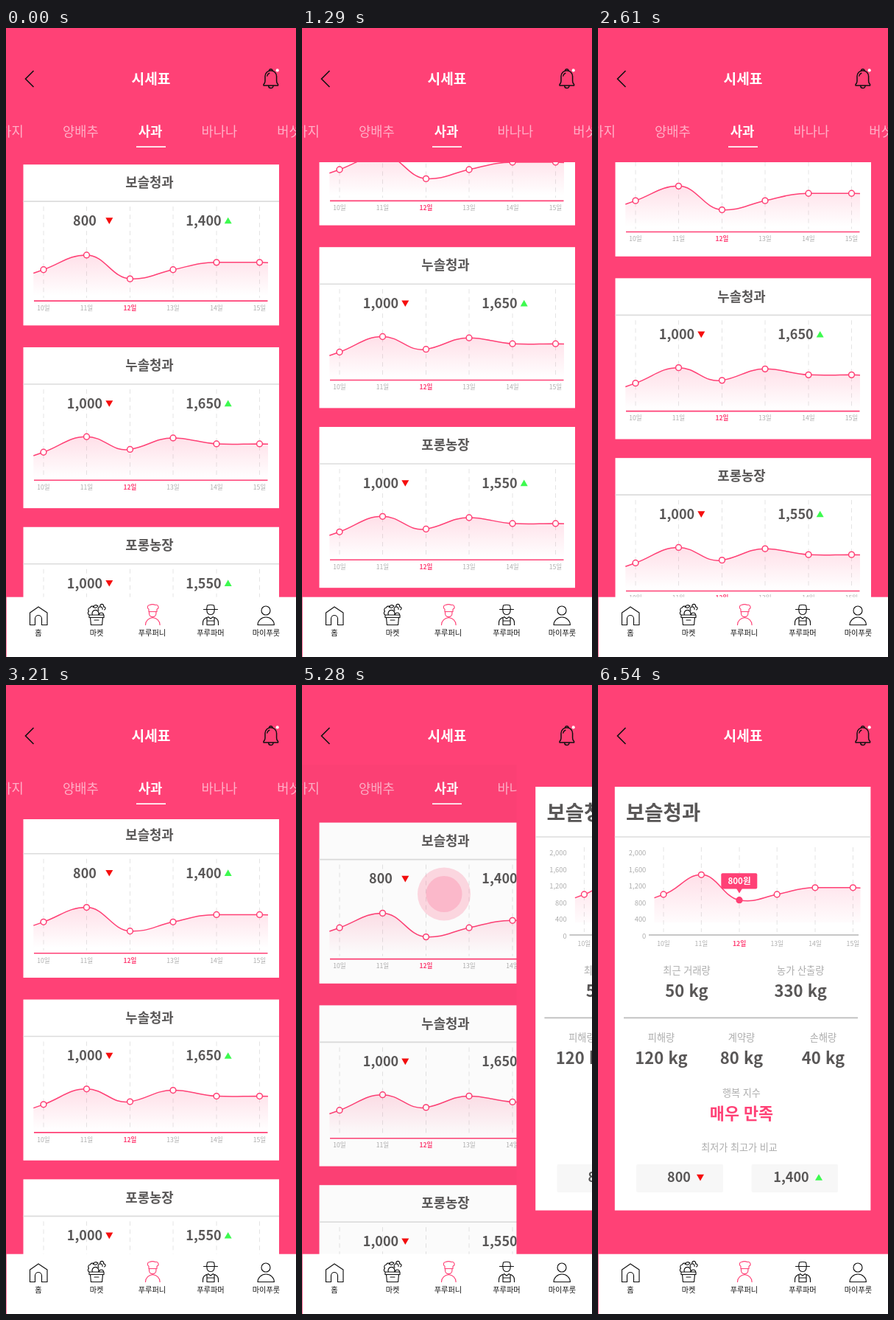
Write an HTML page that moves like this. It is 394x853 px and loops after 8.94 s.

```html
<!DOCTYPE html>
<html lang="ko">
<head>
<meta charset="utf-8">
<style>
html, body { margin: 0; width: 100%; height: 100%; overflow: hidden; background: #ff4176; }
svg { display: block; width: 394px; height: 853px; font-family: 'Noto Sans CJK KR', 'Noto Sans CJK JP', 'Noto Sans CJK', sans-serif; }
</style>
</head>
<body>
<svg id="stage" viewBox="0 0 394 853" xmlns="http://www.w3.org/2000/svg"></svg>
<script>
const PINK = '#ff4176', INK = '#595757', GREY = '#adadad';
const LOOP = 8940;
const SHOPS = ['보슬청과', '누솔청과', '포롱농장'];

const text = (x, y, size, str, fill = INK, weight = 700, anchor = 'middle') =>
  `<text x="${x}" y="${y}" font-size="${size}" fill="${fill}" font-weight="${weight}" text-anchor="${anchor}">${str}</text>`;
const rect = (x, y, w, h, fill, r = 0) =>
  `<rect x="${x}" y="${y}" width="${w}" height="${h}" fill="${fill}" rx="${r}"/>`;
const line = (x1, y1, x2, y2, color, width, extra = '') =>
  `<path d="M${x1} ${y1}L${x2} ${y2}" stroke="${color}" stroke-width="${width}" fill="none" ${extra}/>`;
const down = (x, y) => `<path d="M${x - 5} ${y - 4}h10l-5 8.6z" fill="#f60d0d"/>`;
const up = (x, y) => `<path d="M${x - 5} ${y + 4}h10l-5 -8.6z" fill="#3dfa4f"/>`;
const circle = (x, y, r, fill, extra = '') => `<circle cx="${x}" cy="${y}" r="${r}" fill="${fill}" ${extra}/>`;

// Smooth line through the points; each slope sets the tangent at its point.
function curve(xs, ys, slopes, start, end) {
  let d = `M${start[0]} ${start[1]}L${xs[0]} ${ys[0]}`;
  for (let i = 1; i < xs.length; i++) {
    const h = (xs[i] - xs[i - 1]) * 0.42;
    d += `C${xs[i - 1] + h} ${ys[i - 1] + slopes[i - 1] * h} ${xs[i] - h} ${ys[i] - slopes[i] * h} ${xs[i]} ${ys[i]}`;
  }
  return d + `L${end[0]} ${end[1]}`;
}

function chart({ xs, ys, slopes, start, end, top, axis, base, fade, labelY, labelSize, axisLine, picked }) {
  const d = curve(xs, ys, slopes, start, end);
  return xs.map(x => line(x, top, x, axis - 4, '#e4e4e4', 1, 'stroke-dasharray="6 5"')).join('') +
    `<path d="${d}V${base}H${start[0]}Z" fill="url(#${fade})"/>` + axisLine +
    `<path d="${d}" fill="none" stroke="${PINK}" stroke-width="1.5"/>` +
    xs.map((x, i) =>
      circle(x, ys[i], 3.9, picked === i ? PINK : '#fff', `stroke="${PINK}" stroke-width="1.5"`) +
      text(x, labelY, labelSize, `${10 + i}일`, i === 2 ? PINK : GREY, i === 2 ? 700 : 400)).join('');
}

const cardXs = [51, 109.5, 168.5, 227, 286, 344.5];

function card(i, y, low, high) {
  const first = i === 0, axis = first ? 185 : 180.3;
  const ys = first ? [142.6, 122.8, 155, 142.6, 132.7, 132.7] : [142.3, 121.3, 138.5, 123, 131, 131];
  const slopes = first ? [-.36, 0, .05, -.21, 0, 0] : [-.36, 0, -.16, 0, .05, 0];
  return `<g transform="translate(0 ${y})">` +
    rect(23.5, 0, 347.5, 218.2, '#fff') +
    text(195, 31.2, 17.8, SHOPS[i]) +
    line(23.5, 50, 371, 50, '#dcdcdc', 1.6) +
    chart({
      xs: cardXs, ys, slopes, start: [37.3, ys[0] + 4.8], end: [356, ys[5] + .3], top: 57, axis, base: 180,
      fade: 'cardFade', labelY: axis + 12.8, labelSize: 8.6,
      axisLine: line(38, axis, 355.5, axis, PINK, 1.6)
    }) +
    text(107, 82.8, 18, low) + down(140.3, 76.2) +
    text(268.5, 82.8, 18, high) + up(301.7, 76.2) + '</g>';
}

function detail() {
  const xs = [89, 140.4, 192, 243.2, 295, 346.4];
  const pair = (x, y, label, value) =>
    text(x, y, 13.2, label, GREY, 400) + text(x, y + 31.3, 22, value);
  return rect(-3, 108, 400, 664, PINK) + rect(22.8, 138, 347.6, 574.5, '#fff') +
    text(38, 182.5, 27.5, SHOPS[0], INK, 700, 'start') +
    line(22.8, 206, 370.4, 206, '#dcdcdc', 1.6) +
    ['2,000', '1,600', '1,200', '800', '400', '0'].map((s, i) =>
      text(65.3, 231 + i * 22.5, 9.4, s, GREY, 400, 'end')).join('') +
    chart({
      xs, ys: [284, 257.3, 291.7, 284, 274.8, 274.8], slopes: [-.3, 0, .17, -.2, 0, 0],
      start: [76.5, 288.6], end: [356.5, 275.2], top: 220, axis: 339, base: 322, fade: 'bigFade',
      labelY: 354.3, labelSize: 8.7, picked: 2, axisLine: line(69, 339, 354, 339, '#b5b5b5', 1.7)
    }) +
    pair(120.5, 391.8, '최근 거래량', '50 kg') + pair(275.2, 391.8, '농가 산출량', '330 kg') +
    line(35, 451.3, 353, 451.3, '#bcbcbc', 1.7) +
    pair(86, 483, '피해량', '120 kg') + pair(195, 483, '계약량', '80 kg') + pair(306, 483, '손해량', '40 kg') +
    text(195, 558, 13.1, '행복 지수', GREY, 400) + text(195, 589, 21.8, '매우 만족', PINK) +
    text(192, 631.5, 13.1, '최저가 최고가 비교', GREY, 400) +
    rect(52, 650, 118, 38, '#f7f7f7', 2) + text(110, 674.4, 18, '800') + down(139, 667.8) +
    rect(208.5, 650, 117.5, 38, '#f7f7f7', 2) + text(262.5, 674.4, 18, '1,400') + up(300, 667.8) +
    `<g id="tip">${rect(167.3, 255.3, 49, 21.3, PINK, 2)}<path d="M188 276h8l-4 6.5z" fill="${PINK}"/>` +
    text(192, 270.3, 11.6, '800원', '#fff') + '</g>';
}

function header() {
  return text(197, 75.8, 19.2, '시세표', '#fff') +
    '<path d="M37.5 58L26.500 69L37.500 80" fill="none" stroke="#111" stroke-width="1.6"/>' +
    '<g fill="none" stroke="#111" stroke-width="1.5" stroke-linejoin="round" stroke-linecap="round">' +
    '<path d="M352 72V65.500a7.800 7.800 0 0 1 15.600 0V72q0 2.500 2 4.500v1.500H350v-1.500q2 -2 2 -4.500z"/>' +
    '<path d="M357.500 57.500a2.400 2.400 0 0 1 4.600 0M356.800 78.500a3.100 3.100 0 0 0 6.200 0M354.800 65a5 5 0 0 1 3 -3.800"/></g>' +
    circle(368.7, 57.4, 2.1, '#fff');
}

function tabs() {
  return [[7.5, '가지'], [101.5, '양배추'], [196, '사과'], [290, '바나나'], [384.5, '버섯']].map(([x, s]) =>
    text(x, 146.7, 17.7, s, s === '사과' ? '#fff' : '#ffb0c7', s === '사과' ? 700 : 500)).join('') +
    rect(177, 160.3, 40, 1.7, '#fff');
}

function nav() {
  const icon = (d, color = '#111') => `<path d="${d}" fill="none" stroke="${color}" stroke-width="1.15" stroke-linejoin="round" stroke-linecap="round"/>`;
  return rect(.7, 771.7, 394, 82, '#fff') +
    icon('M39.500 809.500H32.500V793L44 785L56 793V809.500H48.500V801a4.500 4.500 0 0 0 -9 0z') +
    icon('M113 796h20v3.500h-20zM114.500 799.500l1 10h15l1 -10M120 803h6' +
      'M113 796a3 3 0 0 1 -.5 -5a3 3 0 0 1 2 -5a3.500 3.500 0 0 1 5 -1.500M117.500 796a4.500 4.500 0 1 1 8 0' +
      'M118 785q3 -4 7 -1q-3 4 -7 1M126 790a3 3 0 1 1 5 -1.500M128 785a2.500 2.500 0 1 1 4.500 0a2 2 0 1 1 1 4M126.500 796a3 3 0 0 1 6 0') +
    icon('M194 791.500v-3.300a3 3 0 0 1 1 -5.700q4 -1.800 8 0a3 3 0 0 1 2 5.700v3.300zM194.500 791.500v2.500a4.700 4.700 0 0 0 9.400 0v-2.500M189.500 809.500a9.800 9.800 0 0 1 19.600 0', PINK) +
    icon('M268.500 788.500h19M272.500 788.500l1 -5.500q4.500 -1.500 9 0l1 5.500M273 788.500v2a5 5 0 0 0 10 0v-2' +
      'M267.500 809.500v-3q0 -6 7 -7.500M288.500 809.500v-3q0 -6 -7 -7.500M273 799.500v10h10v-10M273 804h10M274.500 798.500l3.500 2.500l3.500 -2.500') +
    icon('M347 790a6 6 0 1 0 12 0a6 6 0 1 0 -12 0M342 809.500a11.200 10.500 0 0 1 22.400 0z') +
    [[44, '홈'], [123, '마켓'], [198.5, '푸루퍼니'], [278, '푸루파머'], [353.5, '마이푸룻']].map(([x, s]) =>
      text(x, 823.6, 10.2, s, '#111', 500)).join('');
}

const gradient = (id, y1, y2) =>
  `<linearGradient id="${id}" gradientUnits="userSpaceOnUse" x1="0" x2="0" y1="${y1}" y2="${y2}">` +
  `<stop offset="0" stop-color="${PINK}" stop-opacity=".17"/><stop offset="1" stop-color="${PINK}" stop-opacity="0"/></linearGradient>`;

const $ = id => document.getElementById(id);
$('stage').innerHTML =
  `<defs>${gradient('cardFade', 120, 178)}${gradient('bigFade', 255, 330)}` +
  '<clipPath id="view"><path d="M0 182H394V772H0z"/></clipPath></defs>' +
  rect(0, 0, 394, 853, PINK) + header() + tabs() +
  `<g clip-path="url(#view)"><g id="list">` +
  card(0, 186.6, '800', '1,400') + card(1, 434.4, '1,000', '1,650') + card(2, 678.2, '1,000', '1,550') + '</g></g>' +
  `<g id="touch">${circle(193, 283.5, 36, PINK, 'opacity=".2"')}${circle(193, 283.5, 24.5, PINK, 'opacity=".2"')}</g>` +
  `<rect id="dim" y="108" width="394" height="664"/><g id="detail">${detail()}</g>` + nav();

// Cubic ease-in-out with handles at .42 and .58.
function ease(x) {
  if (x <= 0) return 0;
  if (x >= 1) return 1;
  let lo = 0, hi = 1, s;
  for (let i = 0; i < 24; i++) {
    s = (lo + hi) / 2;
    if (1.26 * s - .78 * s * s + .52 * s ** 3 < x) lo = s; else hi = s;
  }
  return 3 * s * s - 2 * s ** 3;
}
const phase = (t, start, length) => ease((t - start) / length);

function draw() {
  const t = performance.now() % LOOP;
  const scroll = t < 1800 ? 1.3 + 142.2 * phase(t, -36, 1558) : 143.5 * (1 - phase(t, 2050, 1390));
  const slide = phase(t, 4929, 1000);
  $('list').setAttribute('transform', `translate(0 ${-scroll})`);
  $('touch').setAttribute('opacity', phase(t, 3570, 460));
  $('dim').setAttribute('opacity', .06 * slide);
  $('detail').setAttribute('transform', `translate(${397 * (1 - slide)} 0)`);
  $('tip').setAttribute('opacity', phase(t, 6060, 490));
  requestAnimationFrame(draw);
}
draw();
</script>
</body>
</html>
```
